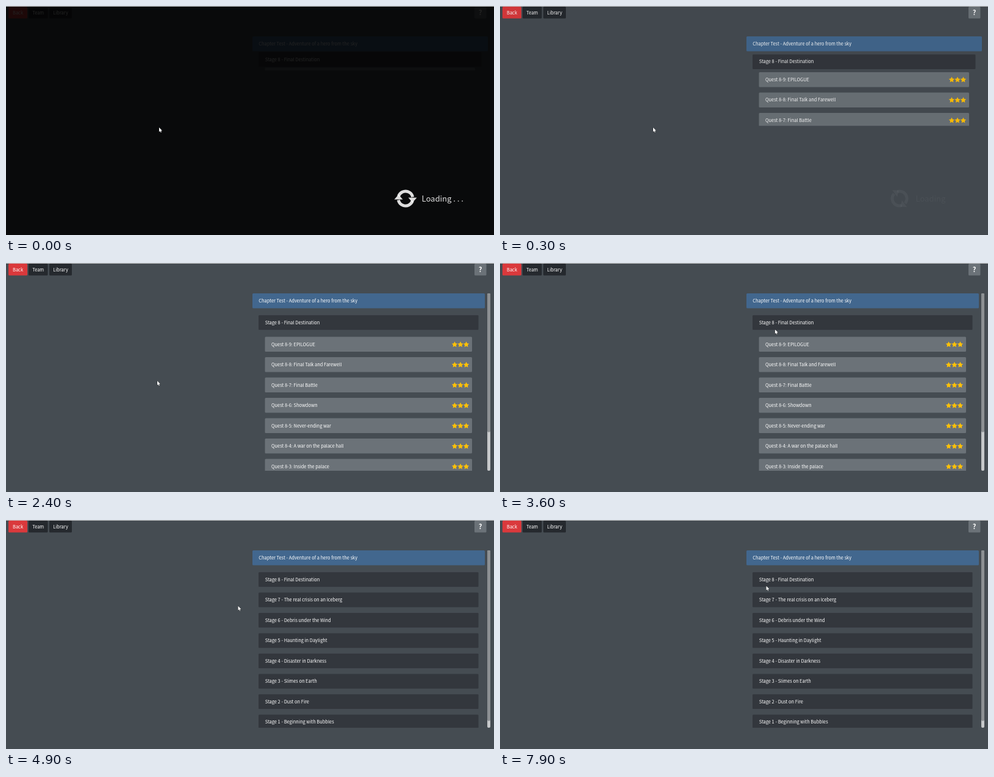
Recreate the animation shown at these times as an HTML page with a canvas. Size 800 by 377 pixels, loop 8 s.

```html
<!DOCTYPE html>
<html lang="en">
<head>
<meta charset="utf-8">
<style>
html, body { margin: 0; height: 100%; overflow: hidden; background: #454c52; }
canvas { display: block; }
</style>
</head>
<body>
<canvas id="stage" width="800" height="377"></canvas>
<script>
const ctx = document.getElementById('stage').getContext('2d');
const LOOP = 8000, ROW = 24.5, PITCH = 33.5, GAP = 11.3;
const TOP = 50, BOTTOM = 342, VIEW = BOTTOM - TOP, HEAD = TOP + ROW;
const FAMILY = '"Noto Sans CJK JP", "Noto Sans CJK SC", "Noto Sans CJK", "Open Sans", sans-serif';
const stages = ['Beginning with Bubbles', 'Dust on Fire', 'Slimes on Earth', 'Disaster in Darkness',
  'Haunting in Daylight', 'Debris under the Wind', 'The real crisis on an Iceberg', 'Final Destination'];
const quests = ['EPILOGUE', 'Final Talk and Farewell', 'Final Battle', 'Showdown', 'Never-ending war',
  'A war on the palace hall', 'Inside the palace'];
// time, x, y of the pointer tip
const pointer = [[0, 251, 200], [2250, 251, 200], [2400, 248, 194], [2900, 248, 194], [3650, 453, 108.5],
  [4300, 453, 108.5], [4800, 380.5, 141.5], [4950, 380.5, 141.5], [5350, 431.5, 70], [6850, 431.5, 70],
  [7400, 435, 110], [7500, 436.5, 108.5], [LOOP, 436.5, 108.5]];

const ramp = (t, start, length) => Math.min(1, Math.max(0, (t - start) / length));
const swing = (t, start, length) => 0.5 - Math.cos(Math.PI * ramp(t, start, length)) / 2;

function box(x, y, right, h, color, r = 1.5) {
  ctx.fillStyle = color;
  ctx.beginPath();
  ctx.roundRect(x, y, right - x, h, r);
  ctx.fill();
}

function text(s, x, y, size = 7.44, align = 'left', weight = 400) {
  ctx.font = `${weight} ${size}px ${FAMILY}`;
  ctx.textAlign = align;
  ctx.fillStyle = '#fff';
  ctx.fillText(s, x, y);
}

function clipped(x, y, w, h, draw) {
  ctx.save();
  ctx.beginPath();
  ctx.rect(x, y, w, Math.max(0, h));
  ctx.clip();
  draw();
  ctx.restore();
}

function star(cx, cy) {
  ctx.beginPath();
  for (let i = 0; i < 10; i++) {
    const r = i % 2 ? 2.5 : 4.9, a = (i / 5 - 0.5) * Math.PI;
    ctx.lineTo(cx + r * Math.cos(a), cy + r * Math.sin(a));
  }
  ctx.closePath();
  ctx.fillStyle = '#ffc107';
  ctx.fill();
}

function button(label, x, right, color) {
  box(x, 1, right, 19.5, color);
  text(label, (x + right) / 2, 13.7, 7.44, 'center');
}

function quest(i, y, right) {
  box(424.5, y, right, ROW, '#6b7278');
  text(`Quest 8-${9 - i}: ${quests[i]}`, 435, y + 15);
  for (let k = 0; k < 3; k++) star(right - 28.5 + k * 9.5, y + 12.6);
}

function stageRow(n, y, right, h = ROW) {
  clipped(400, y, 400, h, () => {
    box(414, y, right, h, '#33373d');
    text(`Stage ${n} - ${stages[n - 1]}`, 424.7, y + 15);
  });
}

function list(t) {
  const open = t < 5000 ? ramp(t, -104, 923)
    : t < 6000 ? 1 - swing(t, 5415, 400) : swing(t, 6700, 400);
  const q = 1 - swing(t, 3905, 400), others = 1 - q;
  const questHeight = q * (9 * PITCH + GAP);
  const body = open < 1 ? open * 279.5
    : GAP + ROW + Math.max(9, questHeight) + 7 * PITCH * others;
  const content = ROW + body, scrolls = content > VIEW + 0.5;
  const right = scrolls ? 785 : 790;

  clipped(400, TOP, 400, VIEW, () => {
    box(404, TOP, right, ROW, '#42678e');
    text('Chapter Test - Adventure of a hero from the sky', 414.3, 65);
    clipped(400, HEAD, 400, body, () => {
      const y = HEAD + GAP * open;
      stageRow(8, y, right - 10.5);
      const end = y + ROW;
      clipped(400, end, 400, questHeight, () => {
        for (let i = 0; i < quests.length; i++)
          quest(i, end + GAP * q * open + i * PITCH, right - 21);
      });
      if (others > 0) for (let i = 0; i < 7; i++)
        stageRow(7 - i, end + Math.max(9, questHeight) + i * PITCH * others, right - 10.5, ROW * others);
    });
  });
  if (scrolls) {
    box(789, TOP, 794, VIEW, '#c6c8ca', 2);
    box(789, TOP, 794, VIEW * VIEW / content, '#8c9093', 2);
  }
}

function spinner(angle) {
  ctx.save();
  ctx.translate(655, 317);
  ctx.rotate(angle);
  ctx.strokeStyle = ctx.fillStyle = '#fff';
  ctx.lineWidth = 5;
  for (let i = 0; i < 2; i++) {
    ctx.beginPath();
    ctx.arc(0, 0, 12, Math.PI * 1.1, Math.PI * 1.93);
    ctx.stroke();
    ctx.beginPath();
    ctx.moveTo(4.5, -1.5);
    ctx.lineTo(18.5, -1.5);
    ctx.lineTo(11.5, 6.5);
    ctx.fill();
    ctx.rotate(Math.PI);
  }
  ctx.restore();
}

function loading(t) {
  const alpha = 1 - swing(t, -113, 480);
  if (alpha <= 0) return;
  ctx.globalAlpha = alpha;
  ctx.fillStyle = '#000';
  ctx.fillRect(0, 0, 800, 377);
  spinner(t / 2000 * Math.PI * 2);
  text(t < 200 ? 'Loading . . .' : 'Loading', 681.5, 322, 13.02);
  ctx.globalAlpha = 1;
}

function cursor(t) {
  const i = pointer.findIndex(p => p[0] > t), [t0, x0, y0] = pointer[i - 1], [t1, x1, y1] = pointer[i];
  const k = swing(t, t0, t1 - t0);
  ctx.save();
  ctx.translate(x0 + (x1 - x0) * k, y0 + (y1 - y0) * k);
  ctx.beginPath();
  for (const [x, y] of [[0, 0], [0, 7.2], [1.7, 5.8], [2.7, 8.2], [3.8, 7.7], [2.8, 5.4], [5, 5.2]]) ctx.lineTo(x, y);
  ctx.closePath();
  ctx.lineWidth = 0.8;
  ctx.strokeStyle = '#16181b';
  ctx.stroke();
  ctx.fillStyle = '#fff';
  ctx.fill();
  ctx.restore();
}

function frame(now) {
  const t = now % LOOP;
  ctx.fillStyle = '#454c52';
  ctx.fillRect(0, 0, 800, 377);
  button('Back', 4, 35, '#da393c');
  button('Team', 37, 68.5, '#25292e');
  button('Library', 71, 108, '#25292e');
  box(768, 1, 787.5, 19.5, '#6b7278');
  text('?', 777.7, 15, 11, 'center', 700);
  list(t);
  loading(t);
  ctx.fillStyle = '#c4c6c8';
  ctx.fillRect(0, 0, 800, 1);
  cursor(t);
  requestAnimationFrame(frame);
}
requestAnimationFrame(frame);
</script>
</body>
</html>
```
